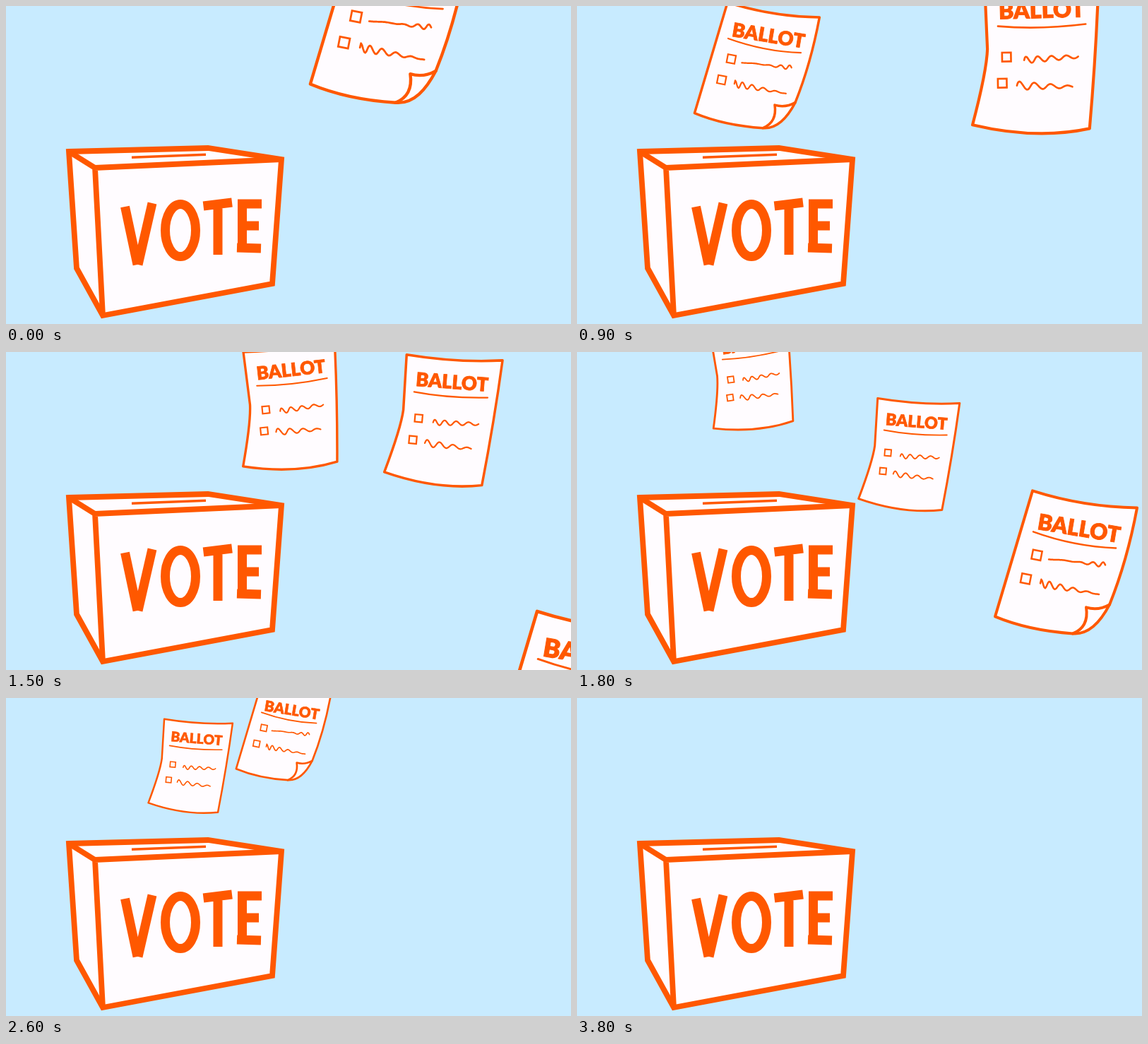
These frames come from a looping animation (800 px wide and 450 px high, 4 s). An HTML page with a canvas:

```html
<!DOCTYPE html>
<html lang="en">
<head>
<meta charset="utf-8">
<title>Vote</title>
<style>
  html, body { margin: 0; width: 100%; height: 100%; overflow: hidden; background: #c8ebff; }
  canvas { display: block; }
</style>
</head>
<body>
<canvas id="stage" width="800" height="450"></canvas>
<script>
const ctx = document.getElementById('stage').getContext('2d');
const SKY = '#c8ebff', ORANGE = '#ff5800', PAPER = '#fffcff';
const LOOP = 4000, STEP = 100, SUNK = 310;

const mix = (a, b, u) => a + (b - a) * u;
const easeOut = (u, power) => 1 - (1 - u) ** power;

// Handwriting: a sine whose pitch follows `bend` and whose height goes from `rise` to `fall`
function scribble([x0, y0], [x1, y1], { waves, bend, rise, fall }) {
  const path = new Path2D(), steps = 60;
  for (let i = 0; i <= steps; i++) {
    const u = i / steps;
    const wave = Math.sin(2 * Math.PI * waves * u ** bend) * mix(rise, fall, u);
    path.lineTo(mix(x0, x1, u), mix(y0, y1, u) - wave);
  }
  return path;
}

const curled = {
  center: [696, 287],
  line: 4, pen: 2.5,
  outline: new Path2D('M645 196Q717 219 793 220Q779 295 754 357C742 380 726 400 702 398Q640 394 592 374Z'),
  fold: new Path2D('M754 357Q738 366 721 361Q725 389 702 398'),
  text: { x: 711, y: 249, size: 31, angle: 9.5 },
  rule: new Path2D('M646 254Q704 275 763 277'),
  boxes: [[651, 287], [635.5, 320.5]], boxSize: 13, boxAngle: 11,
  notes: [
    scribble([668, 293], [748, 301], { waves: 3, bend: 2.2, rise: 3, fall: -4 }),
    scribble([656, 327], [739, 342.5], { waves: 5, bend: 0.75, rise: 6, fall: 0 })
  ]
};

const plain = {
  center: [469, 143],
  line: 3, pen: 1.9,
  outline: new Path2D('M424 66Q485 76 540 73Q530 146 515 224Q460 230 397 208Q417 155 420 133Z'),
  text: { x: 479, y: 99, size: 23, angle: 4.5 },
  rule: new Path2D('M433 111Q475 119 522 118'),
  boxes: [[438.5, 143], [431.5, 169]], boxSize: 9, boxAngle: 5,
  notes: [
    scribble([456, 148], [511, 150], { waves: 4, bend: 0.85, rise: 3.5, fall: 1.5 }),
    scribble([446, 173], [502, 180], { waves: 3.5, bend: 0.9, rise: 4.5, fall: 1 })
  ]
};

// Each ballot glides in from `enter`, hovers over the box, then sinks into the slot.
// `times`, `sizes` and `turns` belong to those three moments.
const ballots = [
  { art: curled, times: [0, 900, 1370], enter: [545, 15], hover: [258, 75], slotX: 245,
    bow: 37, pace: 2, shrink: 1, sizes: [1.097, 0.88, 0.79] },
  { art: plain, times: [400, 1800, 2570], enter: [840, -34], hover: [246, 32.5], slotX: 204,
    bow: 85, pace: 0.87, shrink: 0.87, sizes: [1.6, 0.95, 0.92], turns: [-2, -13, -18] },
  { art: plain, times: [1000, 2300, 3150], enter: [936, -189], hover: [325, 22], slotX: 216,
    bow: 213, pace: 1.5, shrink: 1.5, sizes: [1.53, 0.835, 0.835] },
  { art: curled, times: [1300, 3000, 3600], enter: [889, 625], hover: [254, 56], slotX: 225,
    bow: -205, pace: 1.04, shrink: 1.5, sizes: [1.285, 0.585, 0.57] }
];

function glide({ enter, hover, bow, pace, shrink, sizes, turns }, u) {
  return {
    x: mix(enter[0], hover[0], easeOut(u, pace)),
    y: mix(enter[1], hover[1], u) + bow * 4 * u * (1 - u),
    size: mix(sizes[0], sizes[1], easeOut(u, shrink)),
    turn: mix(turns[0], turns[1], u)
  };
}

function sink({ hover, slotX, sizes, turns }, u) {
  const k = easeOut(u, 2);
  return {
    x: mix(hover[0], slotX, k),
    y: mix(hover[1], SUNK, u ** 1.33),
    size: mix(sizes[1], sizes[2], k),
    turn: mix(turns[1], turns[2], k)
  };
}

function place(x, y, degrees, draw) {
  ctx.save();
  ctx.translate(x, y);
  ctx.rotate(degrees * Math.PI / 180);
  draw();
  ctx.restore();
}

function drawTitle({ x, y, size, angle }) {
  ctx.fillStyle = ORANGE;
  ctx.font = `900 ${size}px Lato, sans-serif`;
  ctx.textAlign = 'center';
  ctx.lineWidth = size * 0.03;
  place(x, y, angle, () => {
    ctx.fillText('BALLOT', 0, size * 0.36);
    ctx.strokeText('BALLOT', 0, size * 0.36);
  });
}

function drawPaper(art) {
  ctx.translate(-art.center[0], -art.center[1]);
  ctx.lineJoin = ctx.lineCap = 'round';
  ctx.strokeStyle = ORANGE;
  ctx.fillStyle = PAPER;
  ctx.lineWidth = art.line;
  ctx.fill(art.outline);
  ctx.stroke(art.outline);
  if (art.fold) ctx.stroke(art.fold);

  ctx.lineWidth = art.pen;
  ctx.stroke(art.rule);
  art.notes.forEach(note => ctx.stroke(note));
  ctx.lineJoin = 'miter';
  const size = art.boxSize;
  for (const [x, y] of art.boxes) {
    place(x, y, art.boxAngle, () => ctx.strokeRect(-size / 2, -size / 2, size, size));
  }
  drawTitle(art.text);
}

const aboveSlot = new Path2D('M0 -50H800V190.5L0 221Z');

function drawBallot(ballot, t) {
  const [start, over, gone] = ballot.times;
  if (t < start || t >= gone) return;
  const sinking = t >= over, moves = { turns: [0, 0, 0], ...ballot };
  const pose = sinking
    ? sink(moves, (t - over) / (gone - over))
    : glide(moves, (t - start) / (over - start));
  ctx.save();
  if (sinking) ctx.clip(aboveSlot);
  place(pose.x, pose.y, pose.turn, () => {
    ctx.scale(pose.size, pose.size);
    drawPaper(ballot.art);
  });
  ctx.restore();
}

const boxShape = new Path2D('M89 206L286 201L390 217L377 393L137 438L100 371Z');
const boxEdges = new Path2D('M89 206L126 229L390 217M126 229L137 438');
const slot = new Path2D('M178 214.3L283 210.3');
const letters = new Path2D(
  'M168.5 284L186 366M207 279L187 366' +
  'M279.5 283L320 278M300 280V352' +
  'M334.5 274V348M328 280H362M334 311H358M327 342L361 343');
letters.moveTo(268.5, 317.5);
letters.ellipse(247, 317.5, 21.5, 37, 0, 0, Math.PI * 2);

function stroke(path, width) {
  ctx.strokeStyle = ORANGE;
  ctx.lineJoin = 'miter';
  ctx.lineCap = 'butt';
  ctx.lineWidth = width;
  ctx.stroke(path);
}

function render(t) {
  ctx.fillStyle = SKY;
  ctx.fillRect(0, 0, 800, 450);
  ctx.fillStyle = PAPER;
  ctx.fill(boxShape);
  stroke(boxShape, 7.8);
  stroke(boxEdges, 7.8);
  stroke(letters, 13);
  ballots.forEach(ballot => drawBallot(ballot, t));
  stroke(slot, 3.6);
}

function tick() {
  const t = performance.now() % LOOP;
  render(Math.floor(t / STEP) * STEP);
  requestAnimationFrame(tick);
}
tick();
</script>
</body>
</html>
```
